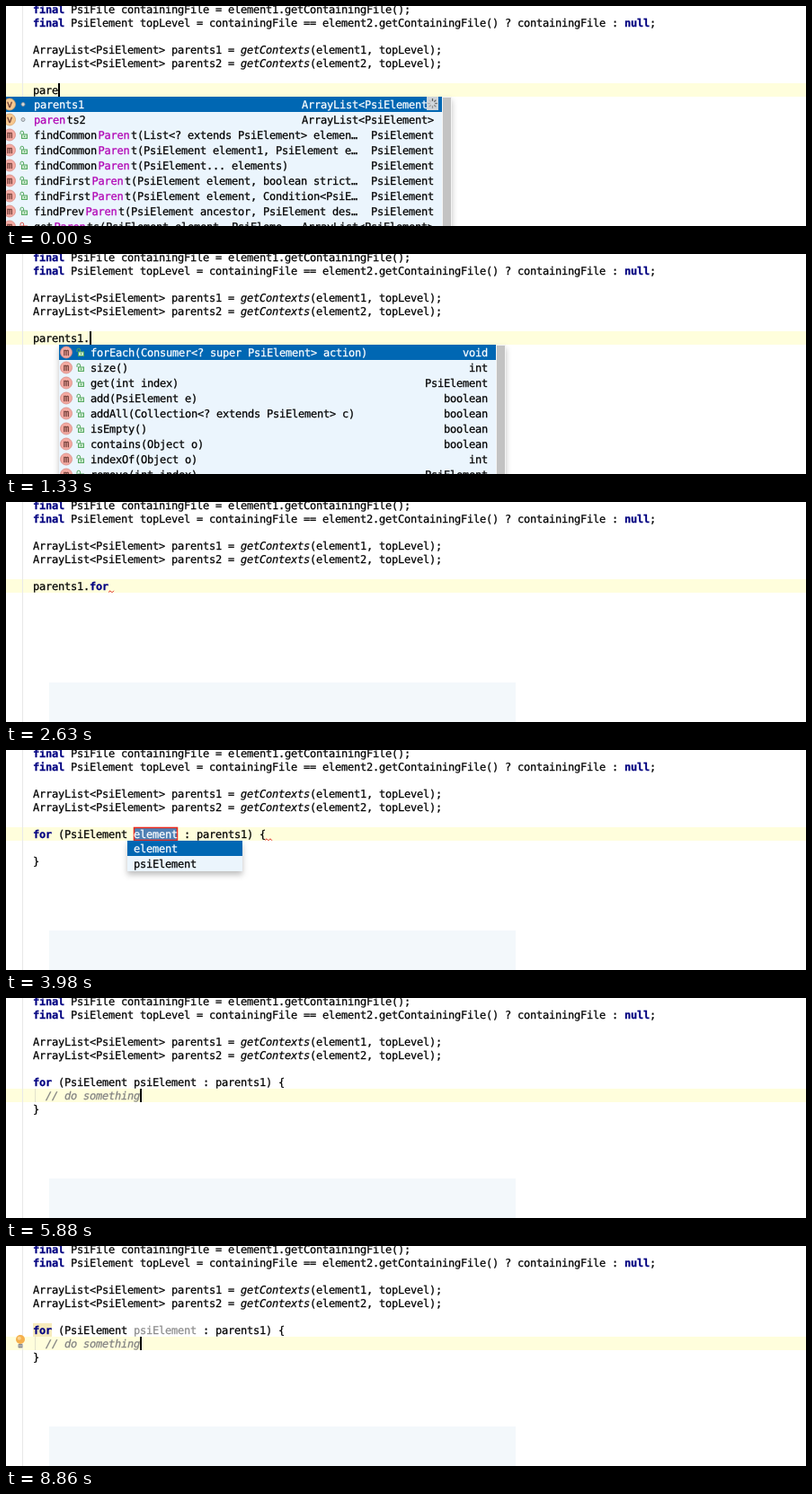
These frames come from a looping animation (890x245 px, 9950 ms). An HTML page:

```html
<!DOCTYPE html>
<html lang="en">
<head>
<meta charset="utf-8">
<title>Code completion</title>
<style>
  html, body { margin: 0; width: 100%; height: 100%; overflow: hidden; background: #fff; }
  svg { display: block; }
  text {
    font: 12px "DejaVu Sans Mono", monospace;
    letter-spacing: -.2246px;
    white-space: pre;
    text-rendering: geometricPrecision;
    color: #000;
    stroke-width: .25px;
  }
  text, tspan { fill: currentColor; stroke: currentColor; }
  .kw { font-weight: bold; color: #000080; }
  .it { font-style: italic; }
  .rem { font-style: italic; color: #808080; }
  .dim { color: #8c8c8c; }
  .hit { color: #b000b4; }
  .inv { color: #fff; }
  .popup { filter: drop-shadow(0 4px 3px rgba(0, 0, 0, .25)); }
  .wave { fill: none; stroke: #e0322a; stroke-width: 1; }
  .badge { font-size: 11px; text-anchor: middle; color: #6b3a34; }
</style>
</head>
<body>
<svg id="stage" width="890" height="245" viewBox="0 0 890 245"></svg>
<script>
const LOOP = 9950, LEFT = 30, CHAR = 7, ROW = 17, TOP = 101;
const stage = document.getElementById('stage');

const esc = s => s.replace(/&/g, '&amp;').replace(/</g, '&lt;');
const rect = (x, y, w, h, fill, more = '') =>
  `<rect x="${x}" y="${y}" width="${w}" height="${h}" fill="${fill}" ${more}/>`;
const span = (cls, s, dx = 0) => `<tspan class="${cls}" dx="${dx}">${esc(s)}</tspan>`;
const text = (x, y, inner, more = '') => `<text x="${x}" y="${y}" ${more}>${inner}</text>`;
const kw = s => span('kw', s);
const col = n => LEFT + n * CHAR;

function wave(x, w) {
  let d = `M${x} 100.5`;
  for (let i = 2; i <= w; i += 2) d += `L${x + i} ${i % 4 ? 98.8 : 100.8}`;
  return `<path class="wave" d="${d}"/>`;
}

const caret = (x, y) => rect(x, y, 2, 15, '#000');

// Editor lines that never change
const header =
  text(LEFT, 8, kw('final') + esc(' PsiFile containingFile = element1.getContainingFile();')) +
  text(LEFT, 23, kw('final') +
    esc(' PsiElement topLevel = containingFile == element2.getContainingFile() ? containingFile : ') +
    kw('null') + ';') +
  [1, 2].map(n => text(LEFT, 38 + n * 15,
    esc(`ArrayList<PsiElement> parents${n} = `) + span('it', 'getContexts') +
    `(element${n}, topLevel);`)).join('');

const PSI = 'PsiElement', LIST = 'ArrayList<PsiElement>';
const names = [
  ['v', 'parents1', LIST],
  ['v', 'parents2', LIST],
  ['m', 'findCommonParent(List<? extends PsiElement> elemen…', PSI],
  ['m', 'findCommonParent(PsiElement element1, PsiElement e…', PSI],
  ['m', 'findCommonParent(PsiElement... elements)', PSI],
  ['m', 'findFirstParent(PsiElement element, boolean strict…', PSI],
  ['m', 'findFirstParent(PsiElement element, Condition<PsiE…', PSI],
  ['m', 'findPrevParent(PsiElement ancestor, PsiElement des…', PSI],
  ['p', 'getParents(PsiElement element, PsiEleme…', LIST]
];
const methods = [
  ['m', 'forEach(Consumer<? super PsiElement> action)', 'void'],
  ['m', 'size()', 'int'],
  ['m', 'get(int index)', PSI],
  ['m', 'add(PsiElement e)', 'boolean'],
  ['m', 'addAll(Collection<? extends PsiElement> c)', 'boolean'],
  ['m', 'isEmpty()', 'boolean'],
  ['m', 'contains(Object o)', 'boolean'],
  ['m', 'indexOf(Object o)', 'int'],
  ['m', 'remove(int index)', PSI]
];
const loops = [
  ['', 'for', 'for (T item : collection)'],
  ['', 'fori', 'for (int i = 0; …; i++)']
];
const ideas = [['', 'element', ''], ['', 'psiElement', '']];

function icons(kind, x, y) {
  const variable = kind === 'v';
  const lock = kind === 'p' ? '#d9534a' : '#55a860';
  const [fill, edge] = variable ? ['#f7c88f', '#d9a468'] : ['#f4aaa2', '#d98a82'];
  return `<circle cx="${x + 8}" cy="${y}" r="6.5" fill="${fill}" stroke="${edge}" stroke-width=".8"/>` +
    text(x + 8, y + 3.2, variable ? 'v' : 'm', 'class="badge"') +
    (variable
      ? `<circle cx="${x + 23}" cy="${y}" r="2" fill="#d5dade" stroke="#8c949b"/>`
      : rect(x + 21.5, y - .5, 6, 4.5, '#c9e8cd', `stroke="${lock}"`) +
        rect(x + 24, y + 1, 1.2, 1.6, lock) +
        `<path d="M${x + 20} ${y - .5}v-2a1.8 1.8 0 0 1 3.6 0v2" fill="none" stroke="${lock}"/>`);
}

// Matched letters are drawn as a separate run, slightly set apart
function mark(label, part) {
  const at = part ? label.toLowerCase().indexOf(part) : -1;
  if (at < 0) return esc(label);
  const end = at + part.length, gap = 1.5;
  return esc(label.slice(0, at)) + span('hit', label.slice(at, end), at ? gap : 0) +
    span('', label.slice(end), gap);
}

function popup({ rows, x, w, picked = 0, part = '', bar = false }) {
  const h = rows.length * ROW;
  const inner = bar ? w - 11 : w;
  let out = rect(x, TOP, w, h, '#ebf5fd');
  rows.forEach(([kind, label, type], i) => {
    const y = TOP + i * ROW, on = i === picked;
    const cls = on ? 'class="inv"' : '';
    if (on) out += rect(x, y, inner, ROW, '#0067b3');
    if (kind) out += icons(kind, x, y + 8.5);
    out += text(x + (kind ? 35 : 7), y + 13, on ? esc(label) : mark(label, part), cls);
    if (type) out += text(x + inner - (bar ? 9 : 7), y + 13, esc(type),
      `${cls} text-anchor="end"`);
  });
  if (bar) out += rect(x + inner, TOP, 11, h, '#f4f4f4') +
    rect(x + inner + 1, TOP + 1, 9, h, '#c3c3c3');
  return `<g class="popup">${out}</g>`;
}

function spinner(turn) {
  let out = rect(468, TOP, 13, 15, '#cfd5da');
  for (let i = 0; i < 8; i++) {
    const shade = 90 + (i + turn) % 8 * 14;
    out += `<path d="M0-2.5V-5.5" stroke="rgb(${shade},${shade},${shade})" stroke-width="1.3" ` +
      `transform="translate(474.5 108.5) rotate(${i * 45})"/>`;
  }
  return out;
}

const bulb = '<circle cx="16" cy="104" r="5" fill="#f5b04c"/>' +
  '<circle cx="14.7" cy="102.7" r="2" fill="#fad48f"/>' +
  rect(13.5, 109, 5, 4.5, '#8b8b8b', 'rx="1"') + rect(13.5, 110.6, 5, 1, '#c9c9c9');

const nameList = { rows: names, x: -4, w: 500, part: 'paren', bar: true };
const methodList = { rows: methods, x: 59, w: 497, bar: true };
const loopList = { rows: loops, x: 86, w: 288, part: 'for' };
const ideaList = { rows: ideas, x: 135, w: 128 };

// Each step changes only the listed properties
const steps = [
  [0, { typed: 'pare', caret: true, list: nameList, busy: true }],
  [140, { typed: 'paren' }],
  [290, { typed: 'parent', list: { ...nameList, part: 'parent' } }],
  [440, { busy: false }],
  [590, { list: null }],
  [740, { typed: 'parents1' }],
  [1040, { typed: 'parents1.' }],
  [1190, { list: methodList }],
  [1480, { typed: 'parents1.f' }],
  [1630, { typed: 'parents1.fo', list: null, ghost: true, error: true }],
  [1750, { typed: 'parents1.for' }],
  [1890, { list: loopList }],
  [2490, { caret: false }],
  [2630, { list: null }],
  [2930, { name: 'element', edit: true, caret: true, list: ideaList }],
  [3980, { caret: false }],
  [4430, { caret: true }],
  [4580, { list: { ...ideaList, picked: 1 } }],
  [4870, { list: null }],
  [5020, { name: 'psiElement', edit: false, remark: '' }],
  [5430, { remark: '// do so', error: false }],
  [5580, { remark: '// do something' }],
  [5880, { guide: true }],
  [6470, { hint: true }],
  [7370, { caret: false }],
  [7670, { caret: true, unused: true }],
  [8420, { caret: false }],
  [8860, { caret: true }]
];

function typedLine(s) {
  const end = col(s.typed.length);
  const [head, tail] = s.typed.split('.');
  const code = tail === 'for' ? head + '.' + kw('for') : s.typed;
  return text(LEFT, 98, code) + (s.error ? wave(end, 6) : '') +
    (s.caret ? caret(end, 86) : '');
}

function loopBlock(s) {
  const at = col(16), w = s.name.length * CHAR;
  const cls = s.edit ? 'inv' : s.unused ? 'dim' : '';
  let out = '';
  if (s.hint) out += rect(LEFT, 86, 21, 15, '#f6ebbc') + bulb;
  if (s.edit) out += rect(at + .5, 86.5, w - 1, 14, '#4f81b5', 'stroke="#ee2a1c" stroke-width="1.5"');
  if (s.guide) out += rect(32, 101, 1, 15, '#e2e2cc');
  out += text(LEFT, 98, kw('for') + ' (PsiElement ' + span(cls, s.name) + ' : parents1) {') +
    text(LEFT, 128, '}');
  if (s.error) out += wave(at + w + 97, 8);
  if (!s.edit) out += text(col(2), 113, span('rem', s.remark));
  if (s.caret) out += s.edit ? caret(at + w, 86) : caret(col(2 + s.remark.length), 101);
  return out;
}

function draw(t) {
  const s = {};
  for (const [at, change] of steps) if (at <= t) Object.assign(s, change);
  const inBody = s.name && !s.edit;
  return rect(0, 0, 890, 245, '#fff') +
    rect(0, inBody ? 101 : 86, 890, 15, '#fffedc') +
    rect(18, 0, 1, 245, '#e8e8e8') +
    (s.ghost ? rect(48, 201, 519, 44, '#f3f8fb') : '') +
    header +
    (s.name ? loopBlock(s) : typedLine(s)) +
    (s.list ? popup(s.list) : '') +
    (s.busy ? spinner(Math.floor(t / 140)) : '');
}

let shown = '';
function tick(now) {
  const next = draw(now % LOOP);
  if (next !== shown) stage.innerHTML = shown = next;
  requestAnimationFrame(tick);
}
tick(performance.now());
</script>
</body>
</html>
```
